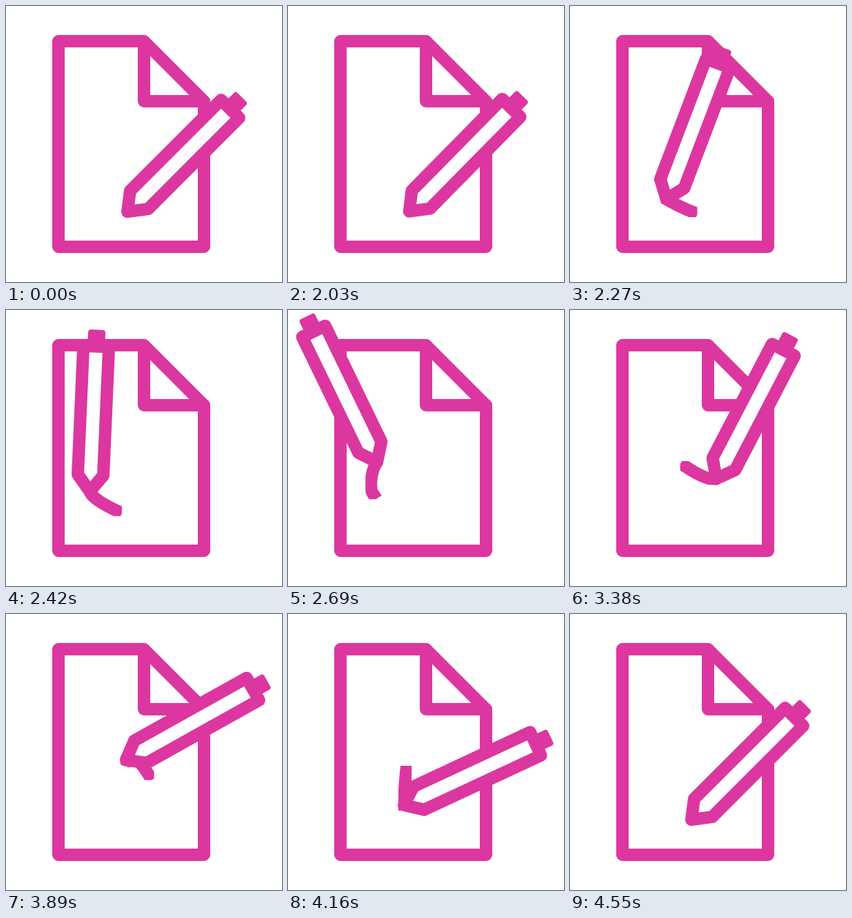
An HTML page with a canvas that plays this animation: 400 px wide and 400 px high, repeating every 4580 ms.

```html
<!DOCTYPE html>
<html lang="en">
<head>
<meta charset="utf-8">
<title>Writing pen</title>
<style>
  html, body { margin: 0; width: 100%; height: 100%; overflow: hidden; background: #fff; }
  canvas { display: block; width: 400px; height: 400px; }
</style>
</head>
<body>
<canvas id="stage" width="400" height="400"></canvas>
<script>
const ctx = document.getElementById('stage').getContext('2d');
const PINK = '#dc37a0';
const LOOP = 4580, START = 2030, STEP = 30;
const PEN = 210.5, TRAIL = 48;

// The scribble: a smooth curve through these pen poses
const KEYS = [
  { t: 2000, x: 176.5, y: 298, tilt: 45 },
  { t: 2420, x: 121.5, y: 263, tilt: 2.5 },
  { t: 2800, x: 142, y: 214, tilt: -32 },
  { t: 3020, x: 185, y: 237.5, tilt: -28.5 },
  { t: 3380, x: 212, y: 244.5, tilt: 27.5 },
  { t: 3890, x: 174, y: 211.5, tilt: 60.8 },
  { t: 4160, x: 168, y: 277, tilt: 65 },
  { t: 4550, x: 176, y: 298, tilt: 45 }
];
const FIRST = KEYS[0], LAST = KEYS[KEYS.length - 1];

function slope(i, name) {
  const a = KEYS[i - 1], b = KEYS[i], c = KEYS[i + 1];
  if (!a || !c) return 0;
  const before = b.t - a.t, after = c.t - b.t;
  return ((b[name] - a[name]) / before * after +
          (c[name] - b[name]) / after * before) / (before + after);
}

function poseAt(time) {
  const t = Math.min(Math.max(time, FIRST.t), LAST.t);
  const i = Math.max(1, KEYS.findIndex(key => key.t >= t));
  const a = KEYS[i - 1], b = KEYS[i], span = b.t - a.t, u = (t - a.t) / span;
  const value = name => a[name] +
    (b[name] - a[name]) * u * u * (3 - 2 * u) +
    span * u * (1 - u) * ((1 - u) * slope(i - 1, name) - u * slope(i, name));
  return { x: value('x'), y: value('y'), tilt: value('tilt') };
}

function trace(points, closed) {
  ctx.beginPath();
  points.forEach(([x, y]) => ctx.lineTo(x, y));
  if (closed) ctx.closePath();
}

function drawPage() {
  trace([[76, 51], [200, 51], [287, 138], [287, 349], [76, 349]], true);
  ctx.stroke();
  trace([[200, 51], [200, 138], [287, 138]]);
  ctx.stroke();
}

// Ink covers the last stretch of the tip's path, cropped to a box
function drawTrail(time, tip) {
  const limit = TRAIL * Math.min(1, (LAST.t - time) / 390);
  const points = [[tip.x, tip.y]];
  let drawn = 0;
  for (let t = time - 5; t > FIRST.t && drawn < limit; t -= 5) {
    const { x, y } = poseAt(t), [px, py] = points[points.length - 1];
    drawn += Math.hypot(x - px, y - py);
    points.push([x, y]);
  }
  const pad = Math.min(8, drawn);
  const xs = points.map(p => p[0]), ys = points.map(p => p[1]);
  const left = Math.min(...xs) - pad, top = Math.min(...ys) - pad;
  ctx.save();
  ctx.beginPath();
  ctx.rect(left, top, Math.max(...xs) + pad - left, Math.max(...ys) + pad - top);
  ctx.clip();
  ctx.lineCap = 'square';
  trace(points);
  ctx.stroke();
  ctx.restore();
}

function drawPen({ x, y, tilt }) {
  ctx.save();
  ctx.translate(x, y);
  ctx.rotate(tilt * Math.PI / 180);
  ctx.fillStyle = PINK;
  ctx.beginPath();
  ctx.roundRect(-12.5, -PEN - 24, 25, 28, 4);
  ctx.fill();
  ctx.fillStyle = '#fff';
  trace([[0, 0], [-18.5, -24], [-18.5, -PEN], [18.5, -PEN], [18.5, -24]], true);
  ctx.fill();
  ctx.stroke();
  ctx.restore();
}

function draw(now) {
  const t = now % LOOP;
  const time = t < START ? LAST.t : START + Math.floor((t - START) / STEP) * STEP;
  const pose = poseAt(time);
  ctx.fillStyle = '#fff';
  ctx.fillRect(0, 0, 400, 400);
  ctx.strokeStyle = PINK;
  ctx.lineWidth = 18;
  ctx.lineJoin = ctx.lineCap = 'round';
  drawPage();
  drawTrail(time, pose);
  drawPen(pose);
}

const begin = performance.now();
function tick() {
  draw(performance.now() - begin);
  requestAnimationFrame(tick);
}
tick();
</script>
</body>
</html>
```
